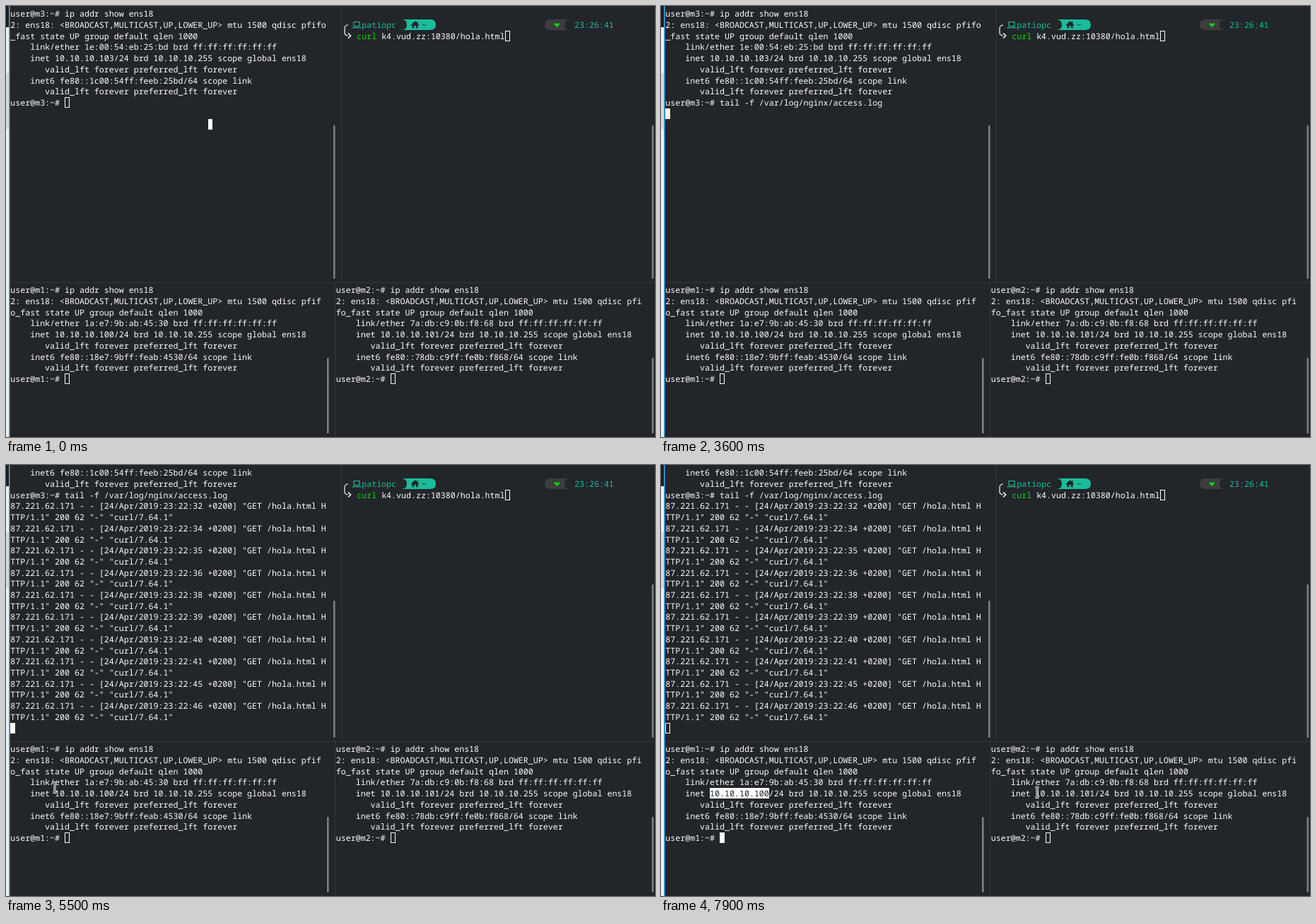
Write an HTML page that moves like this. It is 918 px wide and 610 px high and loops after 8 s.

```html
<!DOCTYPE html>
<html lang="es">
<head>
<meta charset="utf-8">
<title>Terminals</title>
<style>
  html, body { margin: 0; width: 100%; height: 100%; overflow: hidden; background: #222529; }
  svg { display: block; width: 918px; height: 610px; }
  text {
    font: 500 11.633px "Noto Sans Mono", "DejaVu Sans Mono", monospace;
    text-rendering: geometricPrecision;
    fill: #fcfcfc;
  }
</style>
</head>
<body>
<svg id="stage" viewBox="0 0 918 610">
  <rect width="918" height="610" fill="#222529"/>

  <!-- window edge -->
  <rect width="4" height="30" fill="#1b1e21"/>
  <rect y="30" width="4" height="580" fill="#eff0f1"/>
  <rect y="95" width="4" height="79" fill="#d5d8da"/>
  <rect x="4" width="1.5" height="610" fill="#3daee9"/>

  <!-- dividers -->
  <path d="M474.5 0V391.5M5.5 391.5H918M465.5 392V610" stroke="#33383c" fill="none"/>

  <!-- scroll bars -->
  <g fill="#7c7f81">
    <rect id="bar" x="463" width="2.6" rx="1"/>
    <rect x="913.5" y="169" width="2.6" height="217" rx="1"/>
    <rect x="454" y="498" width="2.6" height="107" rx="1"/>
    <rect x="913.5" y="498" width="2.6" height="107" rx="1"/>
  </g>

  <!-- shell prompt -->
  <path d="M559 19H600Q608 19 608 26.5T600 34H559Z" fill="#1abc9c"/>
  <path d="M491 19H559Q567 19 567 26.5T559 34H491Q484 34 484 26.5T491 19Z" fill="#232627"/>
  <g fill="none" stroke="#1abc9c" stroke-width="1.2">
    <path d="M492 22.5H500V28.5H492ZM489.5 30.6H502.5"/>
    <circle cx="871.5" cy="26.5" r="4.6"/>
    <circle cx="885.5" cy="26.5" r="4.6"/>
    <path d="M871.5 23.5V27H869M885.5 23.5V27H883"/>
  </g>
  <path d="M572.5 27L578.5 21.3L581 23.6V22H582.5V25L584.5 27L583.6 27.8L582.6 27V31.3H579.8V28H577.2V31.3H574.4V27L573.4 27.8Z" fill="#232627"/>
  <path d="M484 27Q479 27 479 32V37.500Q479 42 484 42" fill="none" stroke="#fcfcfc" stroke-width="1.2"/>
  <path d="M484 38.500L487.600 42L484 45.500" fill="none" stroke="#fcfcfc" stroke-width="1.6"/>
  <path d="M770 19H797V34H770Q762 34 762 26.500T770 19Z" fill="#3b3d3e"/>
  <path d="M798 19Q790 19 790 26.500T798 34H892V19Z" fill="#222529"/>
  <path d="M775.5 24.5L777.300 24L779.300 25.500L781.300 24L783 24.500V26.500L779.300 30L775.500 26.500Z" fill="#11d116"/>

  <g id="fixed"></g>
  <g id="live"></g>
  <g id="beam">
    <path d="M-2.500 -7H-1Q0 -7 0 -5.500V5.500Q0 7 -1 7H-2.500M2.500 -7H1Q0 -7 0 -5.500M0 5.500Q0 7 1 7H2.500"
          fill="none" stroke="#fcfcfc" stroke-width="3"/>
    <path d="M-2.500 -7H-1Q0 -7 0 -5.500V5.500Q0 7 -1 7H-2.500M2.500 -7H1Q0 -7 0 -5.500M0 5.500Q0 7 1 7H2.500"
          fill="none" stroke="#222529"/>
  </g>
</svg>

<script>
const LOOP = 8000, STEP = 100;
const CELL = 6.98, ROW = 15.7;
const LIGHT = '#fcfcfc', DARK = '#222529', TEAL = '#1abc9c', GREEN = '#11d116';
const $ = id => document.getElementById(id);
const fixed = $('fixed'), live = $('live'), beam = $('beam'), bar = $('bar');

const panes = {
  m3: { x: 6.3, y: 3.45, wrap: 64 },
  sh: { x: 475.3, y: 3.45, wrap: 64 },
  m1: { x: 6.3, y: 394.45, wrap: 63 },
  m2: { x: 466.8, y: 394.45, wrap: 62 }
};

function add(parent, tag, attrs) {
  const el = document.createElementNS('http://www.w3.org/2000/svg', tag);
  for (const k in attrs) el.setAttribute(k, attrs[k]);
  return parent.appendChild(el);
}

function write(parent, pane, col, row, str, color = LIGHT) {
  const el = add(parent, 'text', { x: pane.x + col * CELL, y: pane.y + row * ROW + 11.9 });
  el.style.fill = color;
  el.textContent = str.replace(/ /g, '\u00a0');
}

const writeAll = (parent, pane, lines) =>
  lines.forEach((line, i) => write(parent, pane, 0, i, line));

// Solid cells invert the text they cover.
function block(pane, col, row, str = ' ') {
  const x = Math.round(pane.x + col * CELL);
  const end = Math.round(pane.x + (col + str.length) * CELL);
  add(live, 'rect', { x, y: Math.round(pane.y + row * ROW), width: end - x, height: 15, fill: LIGHT });
  if (str.trim()) write(live, pane, col, row, str, DARK);
}

function cursor(parent, pane, col, row, solid, ch) {
  if (solid) return block(pane, col, row, ch);
  add(parent, 'rect', {
    x: Math.round(pane.x + col * CELL) + 0.5, y: Math.round(pane.y + row * ROW) + 0.5,
    width: 6, height: 14, fill: 'none', stroke: LIGHT
  });
}

const fold = (str, n) => str.length > n ? [str.slice(0, n), ...fold(str.slice(n), n)] : [str];

function ipOutput(host, mac, ip, ip6) {
  const valid = ' '.repeat(7) + 'valid_lft forever preferred_lft forever';
  return [
    `user@${host}:~# ip addr show ens18`,
    ...fold('2: ens18: <BROADCAST,MULTICAST,UP,LOWER_UP> mtu 1500 qdisc pfifo_fast state UP group default qlen 1000', panes[host].wrap),
    `    link/ether ${mac} brd ff:ff:ff:ff:ff:ff`,
    `    inet ${ip}/24 brd 10.10.10.255 scope global ens18`,
    valid,
    `    inet6 ${ip6}/64 scope link`,
    valid
  ];
}

const PROMPT = 'user@m3:~# ', TAIL = 'tail -f /var/log/nginx/access.log';
const before = ipOutput('m3', '1e:00:54:eb:25:bd', '10.10.10.103', 'fe80::1c00:54ff:feeb:25bd');
const log = [32, 34, 35, 36, 38, 39, 40, 41, 45, 46].flatMap(s =>
  fold(`87.221.62.171 - - [24/Apr/2019:23:22:${s} +0200] "GET /hola.html HTTP/1.1" 200 62 "-" "curl/7.64.1"`, 64));
const after = [...before.slice(6), PROMPT + TAIL, ...log];

writeAll(fixed, panes.m1, [...ipOutput('m1', '1a:e7:9b:ab:45:30', '10.10.10.100', 'fe80::18e7:9bff:feab:4530'), 'user@m1:~#']);
writeAll(fixed, panes.m2, [...ipOutput('m2', '7a:db:c9:0b:f8:68', '10.10.10.101', 'fe80::78db:c9ff:fe0b:f868'), 'user@m2:~#']);
write(fixed, panes.sh, 4, 1, 'patiopc', TEAL);
write(fixed, panes.sh, 16.1, 1, '~', DARK);
write(fixed, panes.sh, 47.1, 1, '23:26:41', TEAL);
write(fixed, panes.sh, 3, 2, 'curl', GREEN);
write(fixed, panes.sh, 8, 2, 'k4.vud.zz:10380/hola.html');
cursor(fixed, panes.sh, 33, 2);
cursor(fixed, panes.m2, 11, 8);

// Pointer: one place per step; an empty entry hides it.
const path = [[0]];
const trail = (t, ...pts) => pts.forEach((p, i) => path.push([t + i * STEP, ...p]));
function glide(t, n, [x0, y0], [x1, y1]) {
  for (let i = 1; i <= n; i++) {
    const k = 1 - (1 - i / n) ** 2;
    path.push([t + (i - 1) * STEP, x0 + (x1 - x0) * k, y0 + (y1 - y0) * k]);
  }
}
trail(200, [417, 400], [330, 300], [240, 215], [205, 192]);
trail(1100, []);
trail(4200, [214, 193], [228, 177], [236, 158], [234, 145], [223.5, 152.5]);
glide(4800, 8, [223.5, 152.5], [69, 456.5]);
trail(5600, [71.5, 460], [74, 462], [76, 462.5], [74, 462], [72, 463]);
trail(6200, [72, 463], [86, 463], [112, 464], [138, 464], [151.5, 464.5]);
trail(6800, [152.5, 464.5]);
trail(7000, [160, 466], [220, 471], [330, 468], [450, 456], [550, 447],
  [592, 450], [575, 456], [548, 461], [533, 463], [532, 463.5]);

const focus = [[0, ''], [200, 'm1'], [300, 'm3'], [6200, 'm1']];
const query = [[0, ''], [1800, 't'], [1900, 'ta'], [2000, 'tail']];
const picked = [[0, 0], [6300, 2], [6400, 6], [6500, 10], [6600, 11], [7000, 12]];
const at = (table, t) => table.filter(e => e[0] <= t).pop();

function drawTop(t, solid) {
  const pane = panes.m3, row = before.length;
  if (t >= 4000) {
    writeAll(live, pane, after);
    return cursor(live, pane, 0, after.length, solid);
  }
  writeAll(live, pane, before);
  if (t >= 3600) {
    write(live, pane, 0, row, PROMPT + TAIL);
    cursor(live, pane, 0, row + 1, solid);
  } else if (t >= 1500) {
    const q = at(query, t)[1], lead = `(reverse-i-search)\`${q}': `;
    write(live, pane, 0, row, lead + (q && TAIL));
    cursor(live, pane, lead.length, row, solid, q ? 't' : ' ');
  } else {
    write(live, pane, 0, row, PROMPT);
    cursor(live, pane, PROMPT.length, row, solid);
  }
  if (t < 300) block(pane, 40, 10);
}

function draw(t) {
  live.replaceChildren();
  const active = at(focus, t)[1], n = at(picked, t)[1];
  drawTop(t, active === 'm3');
  cursor(live, panes.m1, 11, 8, active === 'm1');
  if (n) block(panes.m1, 9, 4, '10.10.10.100'.slice(0, n));

  const top = t < 4000 ? 169 : 192;
  bar.setAttribute('y', top);
  bar.setAttribute('height', 386 - top);

  const [, x, y] = at(path, t);
  beam.style.display = x === undefined ? 'none' : '';
  if (x !== undefined) beam.setAttribute('transform', `translate(${x} ${y})`);
}

const start = performance.now();
let shown = -1;
function tick() {
  const t = Math.floor((performance.now() - start) % LOOP / STEP) * STEP;
  if (t !== shown) draw(shown = t);
  requestAnimationFrame(tick);
}
tick();
</script>
</body>
</html>
```
